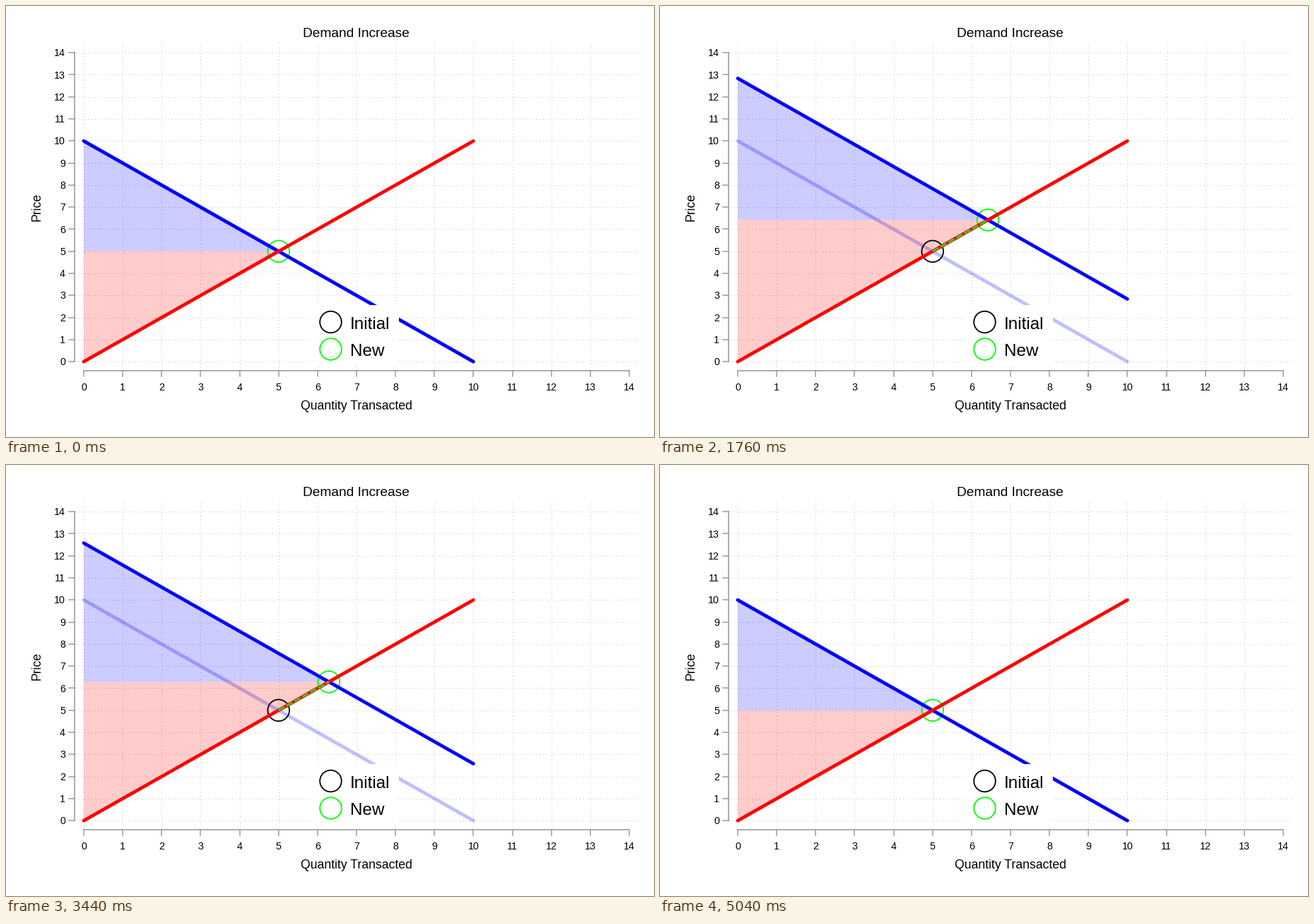
These frames come from a looping animation (917x611 px, 5120 ms). A matplotlib script:

```python
import matplotlib.pyplot as plt
from matplotlib.animation import FuncAnimation
from matplotlib.patches import Circle, Polygon, Rectangle

W, H, DPI = 917, 611, 100
FRAMES, INTERVAL = 64, 80
PT = 72 / DPI
MAX_SHIFT = 4
AXIS = "#9a9a9a"
LIME = "#00ff00"

plt.rcParams["font.family"] = "Liberation Sans"
fig = plt.figure(figsize=(W / DPI, H / DPI), dpi=DPI, facecolor="white")
ax = fig.add_axes([0, 0, 1, 1])
ax.set_xlim(0, W)
ax.set_ylim(H, 0)
ax.axis("off")


def px(q):
    return 110 + q * 772 / 14


def py(p):
    return 504.2 - p * 438 / 14


def line(xs, ys, color, width, z, **kw):
    return ax.plot(xs, ys, color=color, lw=width * PT, zorder=z, **kw)[0]


def curve(p0, p1, color, z, **kw):
    return line([px(0), px(10)], [py(p0), py(p1)], color, 4.8, z,
                solid_capstyle="round", **kw)


def ring(x, y, color, z):
    return ax.add_patch(Circle((x, y), 15.3, fill=False, ec=color,
                               lw=1.8 * PT, zorder=z))


def label(x, y, text, size, ha="center", z=12):
    """Place text so its capitals are centred on y."""
    ax.text(x, y + 0.358 * size, text, fontsize=size * PT, ha=ha,
            va="baseline", color="black", zorder=z)


def area(color):
    return ax.add_patch(Polygon([(0, 0)] * 3, fc=color, ec="none",
                                alpha=0.2, zorder=4))


# Grid, axes and tick labels
dots = dict(dashes=(1.3, 3), dash_capstyle="butt")
for n in range(15):
    x, y = px(n), py(n)
    line([97, 895], [y, y], "#d4d4d4", 1.1, 1, **dots)
    if n < 14:
        line([x, x], [517, 52], "#d4d4d4", 1.1, 1, **dots)
    line([89, 97], [y, y], AXIS, 1.5, 3)
    line([x, x], [517, 525], AXIS, 1.5, 3)
    label(84, y, str(n), 14.2, "right")
    label(x, 540, str(n), 14.2)
line([97, 97], [py(14), py(0)], AXIS, 1.6, 3)
line([px(0), px(14)], [517, 517], AXIS, 1.6, 3)

label(495.5, 36.8, "Demand Increase", 19.2)
label(496, 566, "Quantity Transacted", 17.6)
ax.text(49, 285, "Price", fontsize=17.6 * PT, rotation=90, ha="right",
        va="baseline", rotation_mode="default", zorder=12).set(
            ha="center", va="center", x=43.5)

# Legend
ax.add_patch(Rectangle((433, 424), 123, 87, fc="white", ec="none", zorder=10))
for y, name, color in ((448, "Initial", "black"), (486.5, "New", LIME)):
    ring(459.5, y, color, 11)
    label(487, y + 1, name, 24.2, "left")

# Market
curve(10, 0, "blue", 2, alpha=0.25)
consumer, producer = area("blue"), area("red")
old_ring = ring(px(5), py(5), "black", 5)
new_ring = ring(px(5), py(5), LIME, 6)
demand = curve(10, 0, "blue", 7)
curve(0, 10, "red", 8)
path = line([], [], "#2ad41a", 3, 9, dashes=(3.2, 1.1),
            dash_capstyle="butt")


def update(i):
    step = min(i, FRAMES - 1 - i)
    shift = MAX_SHIFT * step / (FRAMES // 2 - 1)
    eq = 5 + shift / 2
    x, y = px(eq), py(eq)
    demand.set_ydata([py(10 + shift), py(shift)])
    consumer.set_xy([(px(0), py(10 + shift)), (x, y), (px(0), y)])
    producer.set_xy([(px(0), py(0)), (x, y), (px(0), y)])
    new_ring.center = (x, y)
    path.set_data([px(5), x], [py(5), y])
    for mark in (old_ring, path):
        mark.set_visible(step > 0)
    return demand, consumer, producer, old_ring, new_ring, path


anim = FuncAnimation(fig, update, frames=FRAMES, interval=INTERVAL,
                     repeat=True, repeat_delay=0, blit=False)
plt.show()
```
